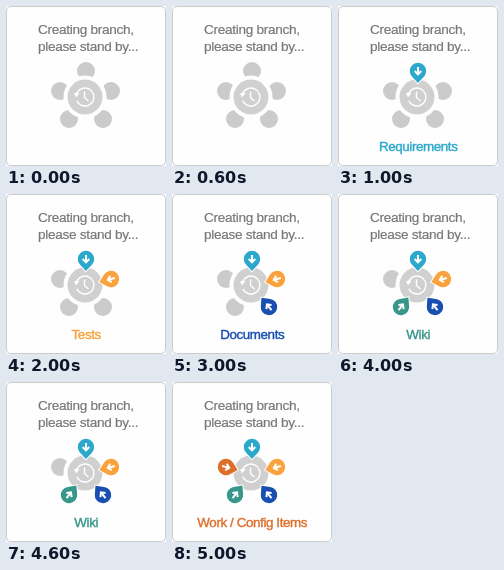
Animation, 160 px wide and 160 px high, one loop 6000 ms. Source, as an HTML page with a canvas:

```html
<!DOCTYPE html>
<html lang="en">
<head>
<meta charset="utf-8">
<title>Creating branch</title>
<style>
  html, body { margin: 0; width: 100%; height: 100%; overflow: hidden; background: #fff; }
  canvas { display: block; width: 160px; height: 160px; }
</style>
</head>
<body>
<canvas id="stage"></canvas>
<script>
const SIZE = 160, STEP = 1000;
const PAPER = '#fefefe', PETAL = '#cbcbcb';
const HUB = { x: 79, y: 91, r: 17.5, gap: 21.5, color: '#d0d0d0' };

// Each step lights one more pin and shows its label.
const PINS = [
  { x: 80, y: 65, color: '#2ba8cb', label: 'Requirements' },
  { x: 105, y: 85, color: '#faa23e', label: 'Tests' },
  { x: 97, y: 113, color: '#184fb0', label: 'Documents' },
  { x: 63, y: 113, color: '#37978a', label: 'Wiki' },
  { x: 54, y: 85, color: '#dd6f2b', label: 'Work / Config Items' }
];

const canvas = document.getElementById('stage');
const ctx = canvas.getContext('2d');
const ratio = window.devicePixelRatio || 1;
canvas.width = canvas.height = SIZE * ratio;

// A thin outline gives the letters their weight.
function text(str, x, y, { color, size, spacing, weight, align }) {
  ctx.font = size + 'px "Liberation Sans", Arial, sans-serif';
  ctx.letterSpacing = spacing + 'px';
  ctx.textAlign = align;
  ctx.fillStyle = ctx.strokeStyle = color;
  ctx.lineWidth = weight;
  ctx.fillText(str, x, y);
  ctx.strokeText(str, x, y);
}

function disc(x, y, r, color) {
  ctx.fillStyle = color;
  ctx.beginPath();
  ctx.arc(x, y, r, 0, Math.PI * 2);
  ctx.fill();
}

function line(points, width) {
  ctx.strokeStyle = '#fff';
  ctx.lineWidth = width;
  ctx.beginPath();
  points.forEach(([x, y]) => ctx.lineTo(x, y));
  ctx.stroke();
}

// A round pin with a white rim whose tip points at the hub.
function pin({ x, y, color }) {
  const r = 8.2, tip = 12, open = Math.acos(r / tip);
  ctx.save();
  ctx.translate(x, y);
  ctx.rotate(Math.atan2(91.5 - y, 79.7 - x));
  ctx.beginPath();
  ctx.arc(0, 0, r, open, Math.PI * 2 - open);
  ctx.lineTo(tip, 0);
  ctx.closePath();
  ctx.strokeStyle = '#fff';
  ctx.lineWidth = 2;
  ctx.stroke();
  ctx.fillStyle = color;
  ctx.fill();
  line([[-4, 0], [3, 0]], 2);
  line([[0, -3.3], [3.3, 0], [0, 3.3]], 2);
  ctx.restore();
}

function clock() {
  ctx.save();
  ctx.translate(HUB.x, HUB.y);
  ctx.strokeStyle = '#fff';
  ctx.lineWidth = 1.4;
  ctx.beginPath();
  ctx.arc(0, 0, 9, -Math.PI * 0.86, Math.PI * 0.86);
  ctx.stroke();
  ctx.fillStyle = '#fff';
  ctx.beginPath();
  ctx.moveTo(-11, -4);
  ctx.lineTo(-5.5, -4);
  ctx.lineTo(-9, 0.5);
  ctx.fill();
  line([[-0.5, -5.5], [-0.5, 0.5], [3.5, 4]], 1.4);
  ctx.restore();
}

function card() {
  ctx.fillStyle = '#fff';
  ctx.fillRect(0, 0, SIZE, SIZE);
  ctx.beginPath();
  ctx.roundRect(0.5, 0.5, SIZE - 1, SIZE - 1, 4);
  ctx.fillStyle = PAPER;
  ctx.fill();
  ctx.strokeStyle = '#cccccc';
  ctx.lineWidth = 1;
  ctx.stroke();
  const title = { color: '#777', size: 13.6, spacing: -0.3, weight: 0.2, align: 'left' };
  text('Creating branch,', 32, 28, title);
  text('please stand by...', 32, 45, title);
}

function draw(time) {
  const step = Math.floor(time / STEP) % (PINS.length + 1);
  ctx.setTransform(ratio, 0, 0, ratio, 0, 0);
  card();
  PINS.slice(step).forEach(p => disc(p.x, p.y, 9, PETAL));
  disc(HUB.x, HUB.y, HUB.gap, PAPER);
  disc(HUB.x, HUB.y, HUB.r, HUB.color);
  PINS.slice(0, step).forEach(pin);
  clock();
  if (step) {
    const { label, color } = PINS[step - 1];
    text(label, 80.2, 145, { color, size: 13.4, spacing: -0.4, weight: 0.4, align: 'center' });
  }
}

const start = performance.now();
function tick() {
  draw(performance.now() - start);
  requestAnimationFrame(tick);
}
tick();
</script>
</body>
</html>
```
